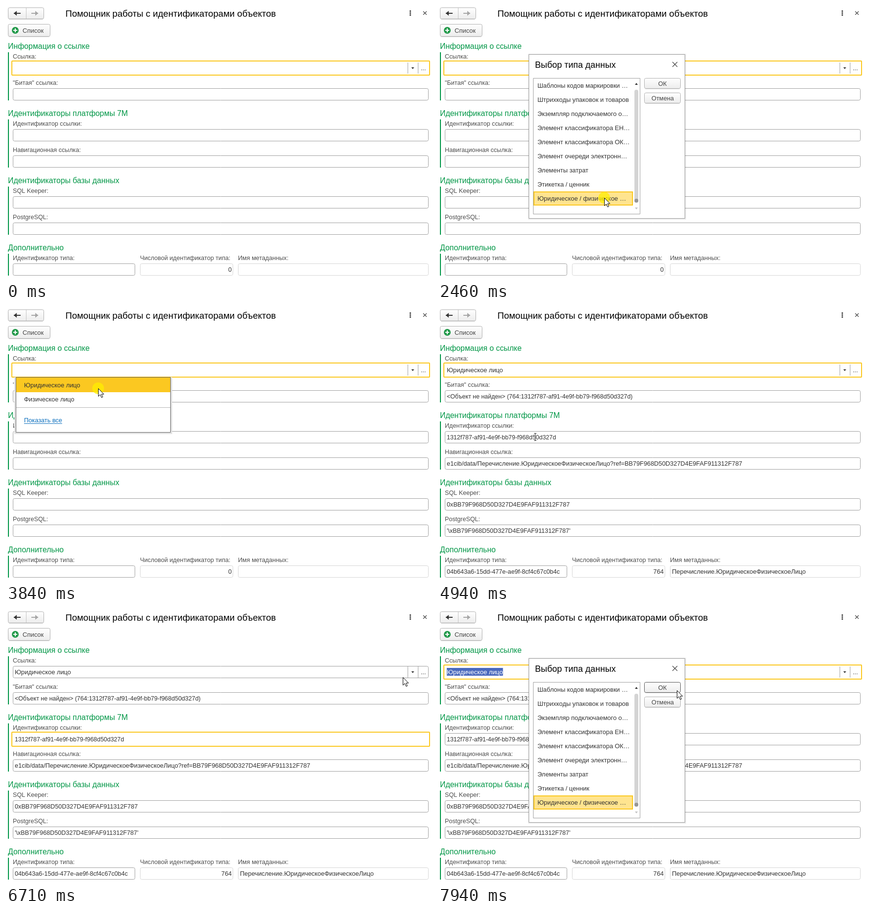
An HTML page with a canvas for the animation above (8 s loop, 874 by 563 pixels).

```html
<!DOCTYPE html>
<html lang="ru">
<head>
<meta charset="utf-8">
<title>Помощник работы с идентификаторами</title>
<style>
  html, body { margin: 0; width: 100%; height: 100%; overflow: hidden; background: #fff; }
  canvas { display: block; }
</style>
</head>
<body>
<canvas id="stage" width="874" height="563"></canvas>
<script>
const ctx = document.getElementById('stage').getContext('2d');
const LOOP = 8000;
const GREEN = '#009646', AMBER = '#fbc821', BORDER = '#a0a0a0', PALE = '#d6d6d6';
const LABEL = '#4d4d4d', INK = '#333', SELECT = '#4a69bd';

const UUID = '1312f787-af91-4e9f-bb79-f968d50d327d';
const HEX = 'BB79F968D50D327D4E9FAF911312F787';
const META = 'Перечисление.ЮридическоеФизическоеЛицо';
const ENTITY = 'Юридическое лицо';

const TYPES = [
  'Шаблоны кодов маркировки …', 'Штрихкоды упаковок и товаров',
  'Экземпляр подключаемого о…', 'Элемент классификатора ЕН…',
  'Элемент классификатора ОК…', 'Элемент очереди электронн…',
  'Элементы затрат', 'Этикетка / ценник', 'Юридическое / физическое …'
];

// Pointer moves: start, end, number of steps, destination
const MOVES = [
  [130, 900, 11, 853, 127],
  [1140, 1680, 8, 341, 394],
  [2690, 3300, 9, 189, 165],
  [4240, 4710, 7, 186, 265],
  [4940, 5170, 4, 270, 265],
  [5400, 5630, 4, 26, 265],
  [6030, 6710, 10, 814, 138],
  [6790, 7020, 4, 862, 126],
  [7330, 7940, 9, 490, 165]
];
const PRESSES = [[830, 990], [2460, 2610], [3840, 4010], [5170, 6030], [7020, 7250]];
const BLINKS = [[130, 660], [2690, 3220], [3610, 3840], [4240, 4710]];

const within = (t, spans) => spans.some(([a, b]) => t >= a && t < b);
const ease = p => p * p * (3 - 2 * p);

function pointerAt(t) {
  let x = 620, y = 464;
  for (const [start, end, steps, toX, toY] of MOVES) {
    if (t < start) break;
    const step = Math.floor((t - start + 1) / ((end - start) / (steps - 1))) + 1;
    const p = ease(Math.min(1, step / steps));
    x += (toX - x) * p;
    y += (toY - y) * p;
  }
  return { x, y };
}

function setFont(size) {
  ctx.font = size + 'px "Liberation Sans", Arial, sans-serif';
}

function text(str, x, y, size = 12.7, color = INK, align = 'left') {
  setFont(size);
  ctx.textAlign = align;
  ctx.fillStyle = color;
  ctx.fillText(str, x, y);
}

function rect(x, y, w, h, color) {
  ctx.fillStyle = color;
  ctx.fillRect(x, y, w, h);
}

function box(x, y, w, h, stroke, fill = '#fff', radius = 0, line = 1) {
  ctx.beginPath();
  ctx.roundRect(x + line / 2, y + line / 2, w - line, h - line, radius);
  ctx.fillStyle = fill;
  ctx.fill();
  ctx.lineWidth = line;
  ctx.strokeStyle = stroke;
  ctx.stroke();
}

function poly(points, fill) {
  ctx.beginPath();
  points.forEach(([x, y]) => ctx.lineTo(x, y));
  ctx.closePath();
  ctx.fillStyle = fill;
  ctx.fill();
}

function disc(x, y, r, color) {
  ctx.beginPath();
  ctx.arc(x, y, r, 0, Math.PI * 2);
  ctx.fillStyle = color;
  ctx.fill();
}

function button(x, y, w, h, stroke = '#b0b0b0') {
  const shade = ctx.createLinearGradient(0, y, 0, y + h);
  shade.addColorStop(0, '#fff');
  shade.addColorStop(1, '#ececec');
  rect(x + 2, y + h, w - 4, 1, '#dedede');
  box(x, y, w, h, stroke, shade, 3);
}

function cross(x, y, r, color) {
  ctx.beginPath();
  ctx.moveTo(x - r, y - r);
  ctx.lineTo(x + r, y + r);
  ctx.moveTo(x + r, y - r);
  ctx.lineTo(x - r, y + r);
  ctx.lineWidth = 1.2;
  ctx.strokeStyle = color;
  ctx.stroke();
}

function arrow(x, y, dir, color) {
  rect(Math.min(x, x + 14 * dir), y - 1, 14, 2, color);
  poly([[x, y], [x + 6 * dir, y - 5], [x + 6 * dir, y + 5]], color);
}

function group(title, y, height) {
  text(title, 4, y, 15.9, GREEN);
  rect(4, y + 7, 2, height, GREEN);
}

function field(label, y, value, size, x = 14, w = 853, stroke = BORDER) {
  text(label, x, y - 7, 12.65, LABEL);
  box(x, y, w, 25, stroke, '#fff', 3);
  if (value) text(value, x + 4, y + 17, size);
}

function focusFrame(y) {
  box(11, y - 3, 859, 31, AMBER, '#fff', 1, 2);
}

function selection(str, from, x, y, size) {
  setFont(size);
  const left = x + ctx.measureText(str.slice(0, from)).width;
  const part = str.slice(from);
  rect(left, y - 13, ctx.measureText(part).width, 16, SELECT);
  text(part, left, y, size, '#fff');
}

function header() {
  button(4, 3, 74, 24);
  rect(41, 4, 1, 22, '#c4c4c4');
  arrow(16, 15, 1, INK);
  arrow(66, 15, -1, '#a6a6a6');
  text('Помощник работы с идентификаторами объектов', 122, 22, 18.65, '#000');
  for (const y of [10, 14, 18]) rect(828, y - 1, 3, 3, '#555');
  cross(859.5, 14.5, 3.5, '#444');
  button(4, 37, 87, 26);
  disc(19, 50, 7, '#239a4b');
  rect(15, 49, 8, 2, '#fff');
  rect(18, 46, 2, 8, '#fff');
  text('Список', 34, 55, 13, '#444');
}

function form(t, pointer) {
  const full = t >= 4010;
  const idFocus = t >= 5170 && t < 7020;
  const val = s => full ? s : '';

  group('Информация о ссылке', 88, 99);
  field('Ссылка:', 115);
  if (!idFocus) focusFrame(115);
  if (full) text(ENTITY, 18, 132, 12.9);
  if (t >= 7020) selection(ENTITY, 0, 18, 132, 12.9);
  rect(824, 116, 1, 23, BORDER);
  rect(845, 116, 1, 23, BORDER);
  poly([[831.5, 126], [837.5, 126], [834.5, 129.5]], INK);
  text('...', 851, 132, 12.7);
  if (within(t, BLINKS)) rect(18, 119, 1, 16, '#000');
  field('"Битая" ссылка:', 169, val('<Объект не найден> (764:' + UUID + ')'), 12.5);

  group('Идентификаторы платформы 7М', 226, 99);
  field('Идентификатор ссылки:', 253);
  if (idFocus) focusFrame(253);
  if (full) text(UUID, 18, 270, 12.45);
  if (idFocus && t >= 5400) {
    setFont(12.45);
    let from = 0;
    while (from < UUID.length && ctx.measureText(UUID.slice(0, from + 1)).width <= pointer.x - 18) from++;
    selection(UUID, from, 18, 270, 12.45);
  }
  field('Навигационная ссылка:', 307,
    val('e1cib/data/' + META + '?ref=' + HEX), 12.83);

  group('Идентификаторы базы данных', 364, 99);
  field('SQL Keeper:', 391, val('0x' + HEX), 12.7);
  field('PostgreSQL:', 445, val("'\\x" + HEX + "'"), 12.7);

  group('Дополнительно', 502, 45);
  field('Идентификатор типа:', 529, val('04b643a6-15dd-477e-ae9f-8cf4c67c0b4c'), 12.65, 14, 251);
  field('Числовой идентификатор типа:', 529, '', 12.7, 275, 191, PALE);
  text(full ? '764' : '0', 463, 546, 12.7, INK, 'right');
  field('Имя метаданных:', 529, val(META), 12.93, 476, 391, PALE);
}

function typeDialog(okActive) {
  rect(185, 98, 324, 341, 'rgba(0,0,0,.07)');
  box(186, 99, 321, 338, '#999');
  text('Выбор типа данных', 199, 127, 18, '#000');
  cross(486, 120, 5, '#444');
  box(195, 148, 220, 280, BORDER);
  box(196, 381, 204, 29, AMBER, '#ffe48f', 0, 2);
  TYPES.forEach((name, i) => text(name, 204, 168 + 29 * i, 12.95));
  poly([[404, 162], [410, 162], [407, 158]], INK);
  poly([[404, 414], [410, 414], [407, 418]], '#c4c4c4');
  ctx.beginPath();
  ctx.roundRect(403, 172, 8, 232, 4);
  ctx.fillStyle = '#d4d4d4';
  ctx.fill();
  disc(407, 400, 4, '#969696');
  button(423, 148, 75, 22, okActive ? '#555' : '#b0b0b0');
  button(423, 178, 75, 22);
  text('ОК', 460.5, 164, 12.9, '#444', 'center');
  text('Отмена', 461, 194, 12.8, '#444', 'center');
}

function choiceMenu() {
  rect(17, 142, 324, 117, '#e2e2e2');
  box(20, 142, 318, 114, '#666');
  rect(21, 143, 316, 30, AMBER);
  text(ENTITY, 37, 163, 12.9);
  text('Физическое лицо', 37, 192, 12.9);
  rect(21, 204, 316, 1, '#b5b5b5');
  text('Показать все', 37, 235, 12.8, '#0a6ebd');
  rect(37, 237, ctx.measureText('Показать все').width, 1, '#0a6ebd');
}

function drawPointer(t, { x, y }) {
  if (within(t, PRESSES)) {
    disc(x, y, 12, `rgba(255,238,0,${t >= 5950 && t < 6030 ? 0.45 : 0.75})`);
  }
  if (t >= 4630 && t < 6030) {
    const cx = Math.round(x);
    rect(cx, y - 8, 1, 16, INK);
    rect(cx - 2, y - 8, 5, 1, INK);
    rect(cx - 2, y + 7, 5, 1, INK);
    return;
  }
  ctx.save();
  ctx.translate(Math.round(x) + 0.5, Math.round(y) + 0.5);
  poly([[0, 0], [0, 16], [3.7, 12.5], [6.5, 18.5], [9, 17.4], [6.4, 11.6], [11.3, 11.6]], '#fff');
  ctx.lineWidth = 1;
  ctx.strokeStyle = '#000';
  ctx.stroke();
  ctx.restore();
}

function draw(t) {
  const pointer = pointerAt(t);
  rect(0, 0, 874, 563, '#fff');
  header();
  form(t, pointer);
  if (within(t, [[990, 2610], [7250, LOOP]])) typeDialog(t >= 7930);
  if (within(t, [[2760, 4010]])) choiceMenu();
  if (t >= 130) drawPointer(t, pointer);
}

const begin = performance.now();
function tick() {
  draw((performance.now() - begin) % LOOP);
  requestAnimationFrame(tick);
}
tick();
</script>
</body>
</html>
```
